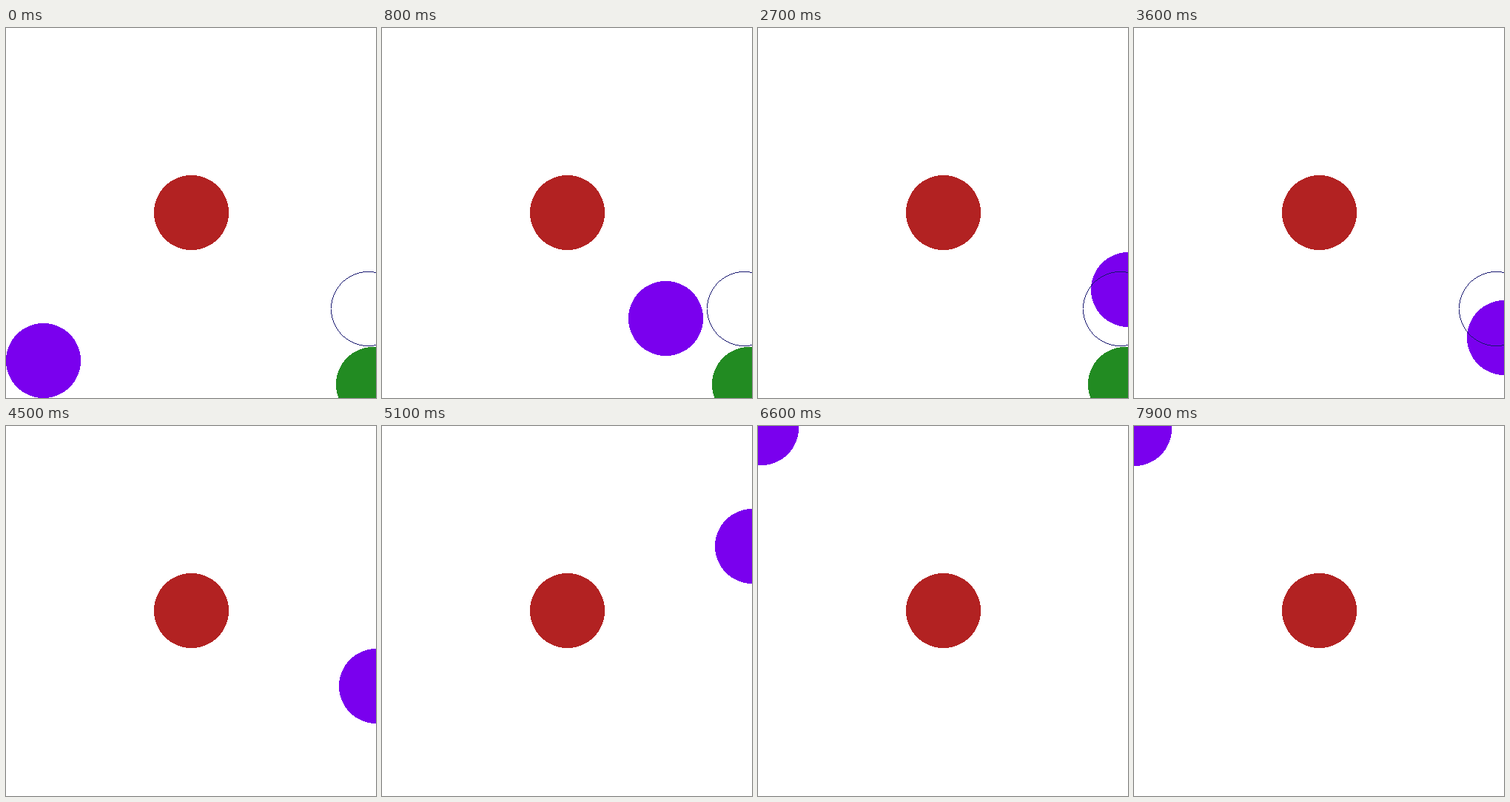
These frames come from a looping animation (500 by 500 pixels, 8 s). An HTML page with a canvas:

```html
<!DOCTYPE html>
<html>
<head>
<meta charset="utf-8">
<style>
html, body { margin: 0; width: 100%; height: 100%; overflow: hidden; background: #fff; }
canvas { display: block; }
</style>
</head>
<body>
<canvas id="stage" width="500" height="500"></canvas>
<script>
const ctx = document.getElementById("stage").getContext("2d");
const LOOP = 8000, STEP = 100, R = 50;
const GREEN_GONE = 31, RING_GONE = 41;

// step, height, speed per step
const keys = [
  [0, 449, -3.7], [9, 381, -11.5], [18, 314, -1.5], [19, 313, 0],
  [27, 353, 9.5], [36, 418, 0], [45, 351, -16], [54, -1, -62]
];

function hermite(n) {
  let i = 0;
  while (i < keys.length - 2 && n > keys[i + 1][0]) i++;
  const [n0, y0, v0] = keys[i], [n1, y1, v1] = keys[i + 1];
  const d = n1 - n0, u = (n - n0) / d, w = 1 - u;
  return y0 * w * w * (1 + 2 * u) + y1 * u * u * (3 - 2 * u)
    + d * (v0 * u * w * w - v1 * u * u * w);
}

function ballX(n) {
  if (n < 10) return 50 + 22.6 * n + 2.375 * n * n;
  if (n < 53) return 500;
  if (n < 64) {
    const k = n - 54;
    return Math.max(0, 462 - 39.75 * k - 2.375 * k * k);
  }
  return 6 * Math.abs(Math.sin(Math.PI * (n - 63) / 4));
}

function ballY(n) {
  if (n < 54) return n < 9 ? 449 - 3.68 * n - 0.43 * n * n : hermite(n);
  if (n < 64) return -1;
  return 8 * Math.abs(Math.sin(Math.PI * (n - 62.4) / 4)) - 0.4;
}

// Hard-edged disc, one row at a time
function disc(x, y, color) {
  ctx.fillStyle = color;
  for (let d = -R; d <= R; d++) {
    const h = Math.floor(Math.sqrt((R + 0.5) ** 2 - d * d));
    ctx.fillRect(x - h, y + d, 2 * h + 1, 1);
  }
}

// One-pixel ring, open at the far left and right
function ring(x, y, color) {
  ctx.fillStyle = color;
  const dot = (a, b) => ctx.fillRect(x + a, y + b, 1, 1);
  for (let a = 0; a <= R * Math.SQRT1_2 + 0.5; a++) {
    const b = Math.round(Math.sqrt(R * R - a * a));
    for (const s of [-1, 1]) {
      for (const q of [-1, 1]) {
        dot(s * a, q * b);
        if (a) dot(s * b, q * a);
      }
    }
  }
}

function draw(now) {
  const n = Math.floor((now % LOOP) / STEP);
  ctx.fillStyle = "#fff";
  ctx.fillRect(0, 0, 500, 500);
  disc(250, 249, "#b22222");
  if (n < GREEN_GONE) disc(496, 481, "#228b22");
  disc(Math.round(ballX(n)), Math.round(ballY(n)), "#7a00ee");
  if (n < RING_GONE) ring(489, 379, "#191970");
}

const start = performance.now();
function tick() {
  draw(performance.now() - start);
  requestAnimationFrame(tick);
}
tick();
</script>
</body>
</html>
```
